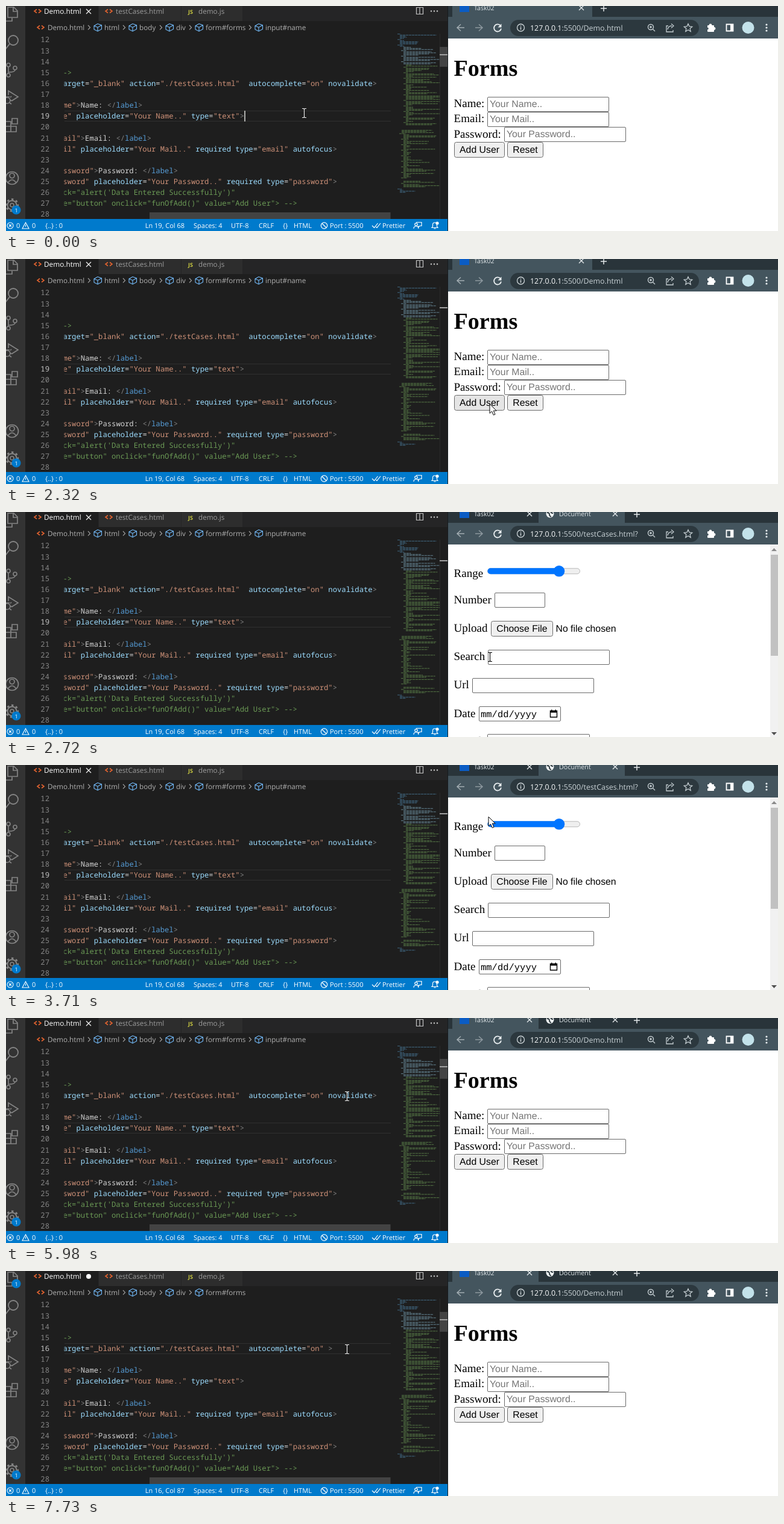
Recreate the animation shown at these times as an HTML page with a canvas. Size 1280x374 px, loop 8 s.

```html
<!DOCTYPE html>
<html lang="en">
<head>
<meta charset="utf-8">
<title>Form validation demo</title>
<style>
html, body { margin: 0; width: 1280px; height: 374px; overflow: hidden; background: #1e1e1e; }
canvas { display: block; }
</style>
</head>
<body>
<canvas id="stage" width="1280" height="374"></canvas>
<script>
const LOOP = 8000;
const c = document.getElementById('stage').getContext('2d', { alpha: false });
c.textRendering = 'geometricPrecision';

const ui = size => `${size}px "Open Sans", "Noto Sans", sans-serif`;
const serif = size => `${size}px "Liberation Serif", serif`;
const arial = '15.8px "Liberation Sans", sans-serif';
const MONO = '500 12.22px "Noto Sans Mono", monospace';
const CHAR = 7.332, CODE_X = 94.4, ROW = 18.125;
const BAR = '#44555e', STRIP = '#29343a';

function rect(x, y, w, h, color) {
  c.fillStyle = color;
  c.fillRect(x, y, w, h);
}
function text(s, x, y, color, font, align = 'left') {
  c.font = font;
  c.fillStyle = color;
  c.textAlign = align;
  c.fillText(s, x, y);
}
function line(d, color, width = 1.2) {
  c.strokeStyle = color;
  c.lineWidth = width;
  c.stroke(new Path2D(d));
}
function shape(d, color) {
  c.fillStyle = color;
  c.fill(new Path2D(d));
}
function disc(x, y, r, color) {
  c.fillStyle = color;
  c.beginPath();
  c.arc(x, y, r, 0, 7);
  c.fill();
}
function ring(x, y, r, color, width = 1.2) {
  c.strokeStyle = color;
  c.lineWidth = width;
  c.beginPath();
  c.arc(x, y, r, 0, 7);
  c.stroke();
}
function box(x, y, w, h, r, fill, stroke) {
  c.beginPath();
  c.roundRect(x, y, w, h, r);
  c.fillStyle = fill;
  c.fill();
  if (stroke) {
    c.strokeStyle = stroke;
    c.lineWidth = 1;
    c.stroke();
  }
}
const cross = (x, y, r, color, w = 1.3) =>
  line(`M${x - r} ${y - r}l${2 * r} ${2 * r}m0 ${-2 * r}l${-2 * r} ${2 * r}`, color, w);
const plus = (x, y) => line(`M${x - 5} ${y}h10m-5 -5v10`, '#e3e8ea', 1.5);
const noise = i => Math.abs(Math.sin(i * 127.1 + 3.7) * 43758.5) % 1;

// ---- editor ----

const LINES = {
  15: '->',
  16: 'arget="_blank" action="./testCases.html"  autocomplete="on" novalidate>',
  18: 'me">Name: </label>',
  19: 'e" placeholder="Your Name.." type="text">',
  21: 'ail">Email: </label>',
  22: 'il" placeholder="Your Mail.." required type="email" autofocus>',
  24: 'ssword">Password: </label>',
  25: 'sword" placeholder="Your Password.." required type="password">',
  26: 'ck="alert(\'Data Entered Successfully\')"',
  27: 'e="button" onclick="funOfAdd()" value="Add User"> -->'
};
const COMMENTS = [15, 26, 27];

function tokenColor(s) {
  if (s.includes('"')) return '#ce9178';
  if (/[<>]/.test(s)) return '#808080';
  if (s === 'label') return '#569cd6';
  return /[=:]/.test(s) ? '#d4d4d4' : '#9cdcfe';
}

function codeLine(n, s) {
  const y = 60.4 + (n - 12) * ROW;
  if (COMMENTS.includes(n)) return text(s, CODE_X, y, '#6a9955', MONO);
  for (const m of s.matchAll(/^[^"= ]*"|"[^"]*"|<\/|[<>=]|\w+:?/g))
    text(m[0], CODE_X + m.index * CHAR, y, tokenColor(m[0]), MONO);
}

// Sections of the overview: first row, last row, left edge, colour, share of long lines
const OVERVIEW = [
  [0, 11, 649, '#4f86ab', 0.5], [12, 27, 655, '#7fa9bd', 0.75], [28, 82, 659, '#6a9955', 0.6],
  [87, 90, 652, '#6a9955', 1], [91, 130, 655, '#6a9955', 0.35], [133, 138, 655, '#6a9955', 0.8],
  [140, 143, 649, '#4f86ab', 0.1]
];

function minimap() {
  c.globalAlpha = 0.65;
  for (const [from, to, left, color, share] of OVERVIEW)
    for (let i = from; i <= to; i++) {
      const x = left + (i % 5 ? 4 : 0), long = i % 5 && noise(i) < share;
      const w = long ? 25 + noise(i + 200) * 40 : 5 + noise(i + 200) * 8;
      const end = Math.min(x + w, 719);
      for (let k = x; k < end; k += 5) rect(k, 46 + i * 1.84, Math.min(4.3, end - k), 1.1, color);
    }
  c.globalAlpha = 1;
}

function badge(y) {
  disc(17, y, 7.6, '#007acc');
  text('1', 17, y + 3.5, '#fff', ui(9), 'center');
}

function activityBar(edited) {
  const g = '#858585';
  rect(0, 0, 32, 354, '#333');
  line('M-6 25H10V20M3 2H13L19 8V19H3ZM12 2V9H19', g, 1.7);
  ring(12, 57, 8, g, 1.8);
  line('M6 63L-1 72', g, 1.8);
  ring(4, 98, 3, g, 1.6);
  ring(15, 103, 3, g, 1.6);
  ring(4, 115, 3, g, 1.6);
  line('M4 101V112M15 106Q15 110 5 110', g, 1.6);
  line('M4 148V141L20 151L9 158M-2 151H6M7 152L9 150M6 157H10M6 161L9 163', g, 1.6);
  ring(2, 157, 5, g, 1.6);
  line('M-2 192H8V209H-2M-2 200H17V209H8M10 187H19V196H10Z', g, 1.7);
  ring(10, 286, 10.5, g, 1.7);
  ring(10, 282, 4, g, 1.7);
  line('M3 294Q10 284 17 294', g, 1.7);
  ring(10, 331, 7.5, g, 1.8);
  c.setLineDash([3.4, 4]);
  ring(10, 331, 9.7, g, 3);
  c.setLineDash([]);
  ring(10, 331, 3, g, 1.6);
  badge(339);
  if (edited) badge(21);
}

const angles = (x, y) => line(`M${x + 4} ${y - 3}l-4 3l4 3m3 -6l4 3l-4 3`, '#e0622f', 1.6);

function cube(x) {
  line(`M${x} 33l6 -3.5l6.5 2.5v6.5l-6.5 3.5l-6 -3zM${x} 33l6 2.5l6.5 -3.5m-6.5 3.5v6.5`, '#75beff', 1.1);
}

function header(edited, inForm) {
  rect(32, 0, 700, 25, '#252526');
  rect(32, 0, 121, 25, '#1e1e1e');
  rect(154, 0, 136, 25, '#2d2d2d');
  rect(291, 0, 101, 25, '#2d2d2d');
  angles(47, 8.5);
  text('Demo.html', 63, 13, '#fff', ui(11.8));
  if (edited) disc(137, 9, 4, '#fff'); else cross(137, 9, 4, '#eee');
  angles(165, 8.5);
  text('testCases.html', 182, 13, '#9c9c9c', ui(11.7));
  text('JS', 302, 12.5, '#cbcb41', 'bold ' + ui(9));
  text('demo.js', 319, 13, '#9c9c9c', ui(11.7));
  line('M680.5 2.5h11v11h-11zM686 2.5v11', '#c5c5c5');
  for (const x of [705, 710, 715]) disc(x, 8.5, 1.2, '#c5c5c5');

  angles(52, 35.5);
  text('Demo.html', 69, 40, '#b0b0b0', ui(11.7));
  const crumbs = [['html', 163], ['body', 221], ['div', 282], ['form#forms', 331], ['input#name', 430]];
  for (const [name, x] of crumbs.slice(0, inForm ? 4 : 5)) {
    line(`M${x - 27} 32l3.5 3.7l-3.5 3.7`, '#a0a0a0');
    cube(x - 17);
    text(name, x, 40, '#b0b0b0', ui(11.7));
  }
}

function statusBar(place) {
  const w = '#fff', put = (s, x, align) => text(s, x, 369, w, ui(11), align);
  rect(0, 354, 732, 20, '#007acc');
  ring(7, 365, 5, w, 1.1);
  cross(7, 365, 2, w, 1.1);
  put('0', 17);
  line('M27 370L32.5 360L38 370ZM32.5 363.5v3.5', w, 1.1);
  put('0', 43);
  put('{..} : 0', 65);
  put(place, 296, 'right');
  put('Spaces: 4', 311);
  put('UTF-8', 373);
  put('CRLF', 419);
  put('{}', 459);
  put('HTML', 477);
  ring(527.5, 365, 5.2, w);
  line('M524 361.5l7 7', w);
  put('Port : 5500', 537);
  line('M607 365l3.5 3.5l6 -7.5m-3 6l1.5 1.5l6 -7.5', w);
  put('Prettier', 624);
  line('M680 359.5h9v6h-3l-2.5 2.5v-2.5M676 370q0 -4 4 -4t4 4', w);
  ring(680, 363, 2.2, w);
  line('M706 368.5h10l-1.5 -2v-3q0 -3.5 -3.5 -3.5t-3.5 3.5v3zM709.5 370h3', w);
  disc(715, 361, 2.6, w);
}

function tooltip() {
  const say = (s, x, y) => text(s, x, y + 4.5, '#d8d8d8', ui(12.65));
  const code = (s, x, y) => {
    box(x - 4.5, y - 9, s.length * CHAR + 9, 17.5, 3, '#1a1a1b');
    text(s, x, y + 4, '#3794ff', MONO);
  };
  rect(463, 138, 269, 158, '#454545');
  rect(464, 139, 268, 156, '#252526');
  ['This Boolean attribute indicates that the', 'form is not to be validated when',
   'submitted. If this attribute is not specified', '(and therefore the form is validated), this',
   'default setting can be overridden by a'].forEach((s, i) => say(s, 471, 152 + i * 18.2));
  code('formnovalidate', 477.5, 243);
  say('attribute on a', 589, 243);
  code('<button>', 477, 263);
  say('or', 545, 263);
  code('<input>', 566, 263);
  say('element', 627, 263);
  say('belonging to the form.', 471, 282);
}

// Column of the text caret, 0 while it is hidden; it blinks every half second
function caretColumn(t) {
  if (t < 2200) return Math.floor((t + 250) / 500) % 2 ? 0 : 41;
  if (t >= 6610 && t < 7110) return 70;
  return t >= 7360 && t < 7730 ? 60 : 0;
}

function editor(t) {
  const selected = t >= 6610 && t < 7360, edited = t >= 7360, inForm = t >= 6610;
  const current = inForm ? 16 : 19;
  const lineTop = Math.round(47 + (current - 12) * ROW);
  const bars = t < 1280 ? 1 : t < 1400 ? 0.9 : t < 5620 ? 0 : Math.min(1, (t - 5500) / 360);

  c.save();
  c.beginPath();
  c.rect(0, 0, 732, 374);
  c.clip();
  rect(0, 0, 732, 374, '#1e1e1e');
  header(edited, inForm);

  if (!selected) {
    rect(97, lineTop, 541, 1, '#303030');
    rect(97, lineTop + 17, 541, 1, '#303030');
  }
  const wordX = CODE_X + 60 * CHAR;
  if (selected) rect(wordX, lineTop, 10 * CHAR, 18, '#264f78');
  else if (t >= 6340 && !edited) rect(wordX, 119.5, 10 * CHAR, 18, 'rgba(38,79,120,.3)');

  for (let n = 12; n <= 28; n++)
    text(n, 72, 60.4 + (n - 12) * ROW, n === current ? '#c6c6c6' : '#858585', MONO, 'right');
  c.save();
  c.beginPath();
  c.rect(96.5, 46, 541, 308);
  c.clip();
  for (const n in LINES)
    codeLine(+n, n === '16' && edited ? LINES[16].replace('novalidate', '') : LINES[n]);
  c.restore();

  minimap();
  rect(719, 46, 1, 308, '#2b2b2b');
  c.globalAlpha = bars;
  rect(238, 343, 399.5, 11, '#434343');
  rect(719, 68, 13, 33, '#434343');
  c.globalAlpha = 1;
  rect(719, 80, 13, 2, '#a0a0a0');

  const caret = caretColumn(t);
  if (caret) rect(Math.floor(CODE_X + caret * CHAR), lineTop, 2, 18, '#aeafad');

  activityBar(edited);
  statusBar(edited ? 'Ln 16, Col 87' : selected ? 'Ln 16, Col 97 (10 selected)' : 'Ln 19, Col 68');
  if (t >= 6340 && t < 6610) {
    c.globalAlpha = t < 6460 ? 0.5 : 1;
    tooltip();
    c.globalAlpha = 1;
  }
  c.restore();
}

// ---- browser ----

let fields = [];

function globe(x, y) {
  disc(x, y, 6.5, '#eef2f3');
  line(`M${x - 5} ${y - 2}q4 0 4 3t3 4M${x + 1} ${y - 5}q0 4 4 4`, STRIP, 1.8);
}

function chrome(tabs, second, loading) {
  const w = '#e8edef', dim = '#8d999f';
  rect(733, 0, 547, 18, STRIP);
  rect(733, 18, 547, 36, BAR);
  if (!tabs) rect(740, 0, 232, 18, BAR);
  else rect(second ? 883 : 740, 0, 143, 18, BAR);
  rect(752, 0, 16, 10, '#0b5cc4');
  text('Task02', 776, 7, '#dfe5e8', ui(10.6));
  cross(tabs ? 868 : 954, 3, 4, w);
  if (tabs) {
    if (loading) {
      const fade = c.createLinearGradient(972, 0, 998, 0);
      fade.addColorStop(0, '#e4eaec');
      fade.addColorStop(1, 'rgba(228,234,236,0)');
      text('127.0.0.1:5500/t', 917, 7, fade, ui(10.8));
    } else {
      globe(902, 3);
      text('Document', 917, 7, '#dfe5e8', ui(10.8));
    }
    cross(1010, 3, 4, w);
  }
  plus(tabs ? 1046 : 991, 4);

  line('M760 36H748M754 30.5L748 36L754 41.5', '#a3adb2', 1.5);
  line('M778 36H790M784 30.5L790 36L784 41.5', dim, 1.5);
  if (loading) cross(815, 36, 5, w, 1.8);
  else {
    line('M820 33A6 6 0 1 0 821 37.5', w, 1.8);
    shape('M821.5 29.5V35.5H815.5Z', w);
  }
  box(836, 23, 313, 27, 13.5, '#2c383e');
  ring(853.5, 36, 6, '#ccd4d7', 1.3);
  line('M853.5 35v4.5M853.5 32.5v1.5', '#ccd4d7', 1.5);
  text('127.0.0.1', 869, 41, '#f8fafb', ui(12.4));
  const host = c.measureText('127.0.0.1').width;
  text(second ? ':5500/testCases.html?' : ':5500/Demo.html', 869 + host, 41, '#c9d2d6', ui(12.4));
  const g = '#c4cdd1';
  ring(1069, 35, 4.5, g, 1.4);
  line('M1072.5 38.5L1076 42M1067 35h4M1069 33v4', g, 1.4);
  line('M1098 33H1095V43H1106V40M1097 39Q1098 33 1104 33M1103 29.5L1107 33L1103 36.5', g, 1.3);
  line('M1131 29.5l2 4.5l4.7 .4l-3.6 3.2l1.1 4.7l-4.2 -2.5l-4.2 2.5l1.1 -4.7l-3.6 -3.2l4.7 -.4z', g, 1.3);
  box(1163, 32, 11, 11, 1, '#fff');
  disc(1168, 32, 2.4, '#fff');
  disc(1174, 37.5, 2.4, '#fff');
  disc(1163, 37.5, 1.8, BAR);
  line('M1194.5 30.5h11v11h-11z', '#fff', 1.8);
  rect(1201, 30, 5, 12, '#fff');
  disc(1230.5, 36, 10, '#c3e2ea');
  for (const y of [31, 36, 41]) disc(1261, y, 1.6, w);
}

const label = (s, y) => text(s, 742.5, y, '#000', serif(19.05));
const field = (x, y, w, hint) => {
  fields.push([x, y, w]);
  box(x + .5, y + .5, w - 1, 24, 1.5, '#fff', '#6a6a6a');
  if (hint) text(hint, x + 4, y + 17.3, '#757575', arial);
};
const button = (s, x, y, w, fill = '#efefef') => {
  box(x + .5, y + .5, w - 1, 25, 3, fill, '#6a6a6a');
  text(s, x + w / 2, y + 18, '#000', arial, 'center');
};

function formPage(hover) {
  text('Forms', 742.5, 116, '#000', 'bold ' + serif(38.1));
  label('Name:', 168);
  field(798, 151, 202, 'Your Name..');
  label('Email:', 193);
  field(798, 176, 202, 'Your Mail..');
  label('Password:', 218.5);
  field(826, 201, 202, 'Your Password..');
  button('Add User', 743, 226, 84, hover ? '#e5e5e5' : '#efefef');
  button('Reset', 831, 226, 60);
}

function testPage() {
  label('Range', 108);
  box(798.5, 93.8, 153, 9, 4.5, '#efefef', '#b8b8b8');
  box(798.5, 93.2, 118, 10, 5, '#0075ff');
  disc(917, 98.3, 9.3, '#0075ff');
  label('Number', 152);
  field(810, 134, 84);
  label('Upload', 199);
  button('Choose File', 804, 181, 103);
  text('No file chosen', 911.5, 199, '#000', arial);
  label('Search', 246);
  field(799, 229, 202);
  label('Url', 293);
  field(773, 276, 202);
  label('Date', 341);
  field(784, 323, 136);
  text('mm/dd/yyyy', 787, 341, '#000', '15.5px "Liberation Mono", monospace');
  line('M902.5 330.5h11v10.5h-11z', '#000', 1.4);
  rect(902, 330, 12, 3.5, '#000');
  rect(904, 328.5, 1.5, 2, '#000');
  rect(910.5, 328.5, 1.5, 2, '#000');
  label('Month', 386.5);
  field(798, 369, 170);
  rect(1267, 54, 13, 320, '#f1f1f1');
  rect(1268, 71, 12, 168, '#c1c1c1');
  shape('M1269 65h9l-4.5 -5z', '#8a8a8a');
  shape('M1269 366h9l-4.5 5z', '#505050');
}

function browser(t) {
  const tabs = t >= 2470, second = tabs && t < 5110, loading = second && t < 2720;
  fields = [];
  rect(732, 0, 1, 374, '#161b1e');
  chrome(tabs, second, loading);
  rect(733, 54, 547, 320, loading ? BAR : '#fff');
  if (loading) rect(733, 53, 547, 1, '#66757d');
  else if (second) testPage();
  else formPage(t >= 1140 && t < 2470);
}

// ---- pointer: time, x, y; it jumps from stop to stop ----

const STOPS = [
  [0, 494, 178], [640, 640, 160], [760, 808, 140], [900, 813, 215], [1020, 814, 286],
  [1140, 815, 262], [1280, 815, 241], [1400, 808, 242], [1550, 802, 241],
  [3470, 803, 200], [3590, 801, 135], [3710, 800, 86], [3960, 798, 58], [4080, 796, 25],
  [4200, 795, 4], [4450, 794, 5], [4570, 793, 7], [5360, 735, 92], [5500, 705, 108],
  [5620, 650, 120], [5740, 605, 127], [5860, 580, 129], [5980, 565, 130]
];

function pointer(t) {
  const [, x, y] = STOPS.findLast(s => s[0] <= t);
  const inEditor = x < 732;
  if (inEditor || fields.some(([fx, fy, w]) => x >= fx && x < fx + w && y >= fy && y < fy + 25)) {
    const beam = `M${x - 3} ${y - 7.5}h2.5l1 1v13l-1 1h-2.5m7 0h-2.5l-1 -1v-13l1 -1h2.5`;
    return line(beam, inEditor ? '#f0f0f0' : '#000', 1.1);
  }
  const arrow = `M${x} ${y}v15.5l3.6 -3.3l2.7 6.2l2.7 -1.2l-2.7 -6h4.9z`;
  shape(arrow, '#fff');
  line(arrow, '#000', 1);
}

function draw(now) {
  const t = now % LOOP;
  editor(t);
  browser(t);
  pointer(t);
  requestAnimationFrame(draw);
}
requestAnimationFrame(draw);
</script>
</body>
</html>
```
